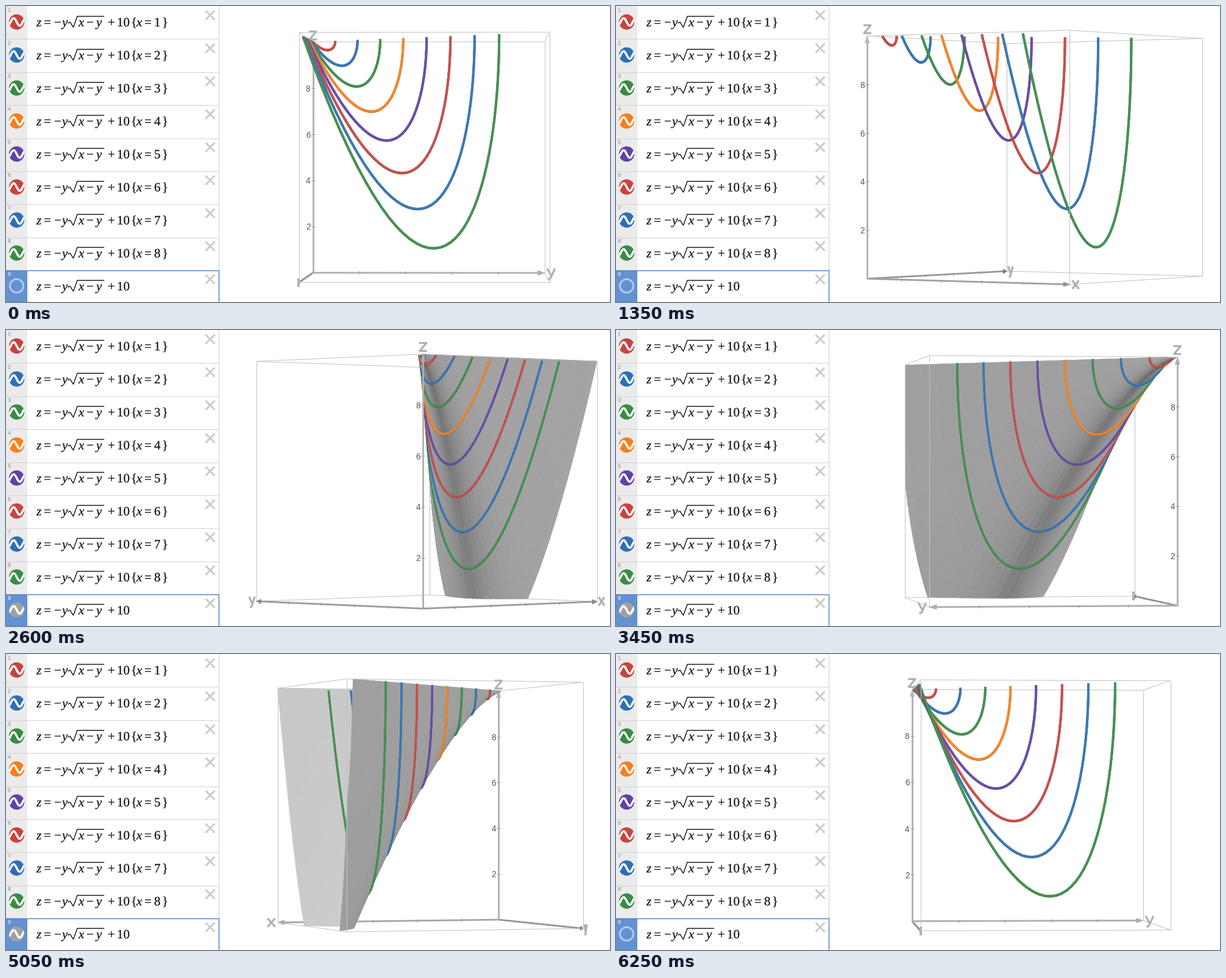
Recreate the animation shown at these times as a matplotlib script. Size 991 by 487 pixels, loop 6300 ms.

```python
import numpy as np
import matplotlib.pyplot as plt
from matplotlib.animation import FuncAnimation
from matplotlib.collections import LineCollection, PolyCollection
from matplotlib.colors import to_rgb
from matplotlib.patches import Circle, PathPatch, Rectangle
from matplotlib.path import Path
from matplotlib.textpath import TextPath

W, H, DPI = 991, 487, 64
PX = 72 / DPI                      # points per pixel
STEP, FRAMES, HOLD = 50, 126, 9
SURFACE_ON, SURFACE_OFF = 1450, 5350

CX, CY, DIST, FOCAL = 690, 249, 125.6, 4963
X0, X1, Y0, Y1 = 0.25, 10.25, 0, 10
MID = np.array([5.25, 5, 5])
TURN_STEPS = [0, 6, 29, 43, 60, 92, 116]
TURN_DEG = [1.05, -17.6, -90.4, -133.9, -188, -288.65, -364.3]

RED, BLUE, GREEN, ORANGE, PURPLE = "#c74440", "#2d70b3", "#388c46", "#fa7e19", "#6042a6"
COLORS = [RED, BLUE, GREEN, ORANGE, PURPLE, RED, BLUE, GREEN]

fig = plt.figure(figsize=(W / DPI, H / DPI), dpi=DPI, facecolor="white")
ax = fig.add_axes([0, 0, 1, 1])
ax.set_xlim(0, W)
ax.set_ylim(H, 0)
ax.axis("off")


# ---------- expression list ----------
def glyphs(x, y, s, size, family="Liberation Serif", style="normal"):
    path = TextPath((0, 0), s, size=size, prop=dict(family=family, style=style))
    return Path(path.vertices * [1, -1] + [x, y], path.codes)


def add_text(paths, color, weight=0):
    ax.add_patch(PathPatch(Path.make_compound_path(*paths), fc=color, ec=color,
                           lw=weight * PX, zorder=6))


def rect(x, y, w, h, color):
    ax.add_patch(Rectangle((x, y), w, h, fc=color, lw=0, zorder=4))


def stroke(xs, ys, color, width, **kw):
    return ax.plot(xs, ys, color=color, lw=width * PX, zorder=6, **kw)[0]


def wave(cy, disc):
    x = np.linspace(3, 32, 50)
    line = stroke(x, cy + 6.2 * np.sin(2 * np.pi * (x - 17.5) / 20), "white", 3.5)
    line.set_clip_path(disc)
    return line


def disc(cy, color):
    return ax.add_patch(Circle((17.5, cy), 12.6, fc=color, lw=0, zorder=5))


def formula(base, k):
    roman = [(62, "="), (79, "\u2212"), (132, "\u2212"), (167, "+"), (182, "10")]
    italic = [(50, "z"), (92, "y"), (119, "x"), (148, "y")]
    if k:
        roman += [(205, "{"), (227, "="), (243, str(k)), (256, "}")]
        italic += [(214, "x")]
    return ([glyphs(x, base, s, 21) for x, s in roman]
            + [glyphs(x, base, s, 21, style="italic") for x, s in italic])


rect(0, 0, 35, H, "#ebebeb")
rect(0, 435, 35, 52, "#6391d2")
rect(349, 0, 1.2, H, "#cccccc")
text, numbers = [], []
for i in range(9):
    top = 54.3 * i
    text += formula(top + 33.5, (i + 1) % 9)
    num = glyphs(3, top + 9.5, str(i + 1), 9, "Liberation Sans")
    if i < 8:
        numbers.append(num)
        rect(0, round(54.4 * (i + 1)), 349, 1, "#d2d2d2")
        wave(top + 26.3, disc(top + 26.3, COLORS[i]))
    else:
        add_text([num], "white")
    stroke([102, 105, 110.5, 117, 160.5], top + np.array([28, 26.5, 35, 17, 17]),
           "black", 1.3)
    for s in (1, -1):
        stroke([328.5, 341.5], [top + 15.2 - 6.5 * s, top + 15.2 + 6.5 * s], "#cccccc", 3)
add_text(text, "#111111", 0.25)
add_text(numbers, "#888888")
stroke([0, 349, 349], [435.3, 435.3, 487], "#4a80c8", 1.4)
stroke([0, 349], [486.6, 486.6], "#4a80c8", 1)

ring = ax.add_patch(Circle((17.5, 460.5), 11, fc="none", ec="#b4cbec", lw=3 * PX, zorder=5))
ball = disc(460.5, "#a0a0a0")
ball_wave = wave(460.5, ball)


# ---------- geometry ----------
def project(p, phi):
    """Screen positions and nearness of points (..., 3)."""
    q = np.asarray(p, float) - MID
    c, s = np.cos(phi), np.sin(phi)
    near = q[..., 0] * c + q[..., 1] * s
    k = FOCAL / (DIST - near)
    side = q[..., 1] * c - q[..., 0] * s
    return np.stack([CX + k * side, CY - k * q[..., 2]], -1), near


def on_surface(x, w):
    """Point of z = 10 - y sqrt(x - y), with w = sqrt(x - y)."""
    y = x - w * w
    return np.stack([x + 0 * w, y, 10 - y * w], -1)


def make_sheets():
    crit = 675 ** (1 / 3)          # x where the valley reaches z = 0
    x = np.r_[np.linspace(X0, crit, 38),
              crit + (10 - crit) * np.linspace(0, 1, 8)[1:] ** 2, 10.08, 10.17, X1]
    # roots of w^3 - x w + 10 = 0, or the valley itself where there are none
    r = 2 * np.sqrt(x / 3)
    a = np.arccos(np.clip(-15 / x * np.sqrt(3 / x), -1, 1)) / 3
    spans = [(r * np.cos(a), np.sqrt(x)),
             (np.sqrt(np.maximum(x - 10, 0)), r * np.cos(a - 2 * np.pi / 3))]
    quads, mids, normals = [], [], []
    v = np.linspace(0, 1, 18)
    for lo, hi in spans:
        w = lo[:, None] + (hi - lo)[:, None] * v
        g = on_surface(x[:, None], w)
        q = np.stack([g[:-1, :-1], g[1:, :-1], g[1:, 1:], g[:-1, 1:]], 2).reshape(-1, 4, 3)
        wm = (w[:-1, :-1] + w[1:, 1:] + w[1:, :-1] + w[:-1, 1:]).ravel() / 4
        m = q.mean(1)
        n = np.stack([-m[:, 1] / 2, m[:, 1] / 2 - wm ** 2, -wm], -1)
        quads.append(q)
        mids.append(m)
        normals.append(n / np.linalg.norm(n, axis=1)[:, None])
    return map(np.concatenate, (quads, mids, normals))


quads, mids, normals = make_sheets()
curves = [on_surface(np.full(41, k), np.linspace(0, np.sqrt(k - 0.03), 41))
          for k in np.arange(1.0, 9)]


def ribbon(p, half):
    t = np.gradient(p, axis=0)
    t /= np.hypot(t[:, 0], t[:, 1])[:, None] + 1e-6
    n = np.stack([-t[:, 1], t[:, 0]], -1) * half
    a, b = p + n, p - n
    return np.stack([a[:-1], a[1:], b[1:], b[:-1]], 1)


def content(phi, solid):
    polys, depth, cols = [], [], []

    def put(q, d, c):
        polys.append(q)
        depth.append(d)
        cols.append(np.broadcast_to(c, (len(q), 3)))

    if solid:
        p, near = project(quads, phi)
        cam = MID + DIST * np.array([np.cos(phi), np.sin(phi), 0])
        outside = ((cam - mids) * normals).sum(1) > 0
        ny, nz = normals[:, 1], normals[:, 2]
        valley = (1 - np.abs(ny)) ** 1.5
        gray = np.where(outside, 0.64 - valley * (0.1 + 0.2 * nz ** 2), 0.765 - 0.06 * nz)
        put(p, near.mean(1), gray[:, None])
    half = 1.45 if solid else 1.75
    for pts, color in zip(curves, COLORS):
        p, near = project(pts, phi)
        d = (near[1:] + near[:-1]) / 2 + 0.55
        rgb = 1 - (1 - np.array(to_rgb(color))) * 0.93
        put(ribbon(p, half), d, rgb * 0.75)
        put(ribbon(p - [0, 0.6], half - 0.3), d + 0.03, rgb)
    order = np.argsort(np.concatenate(depth))
    return np.concatenate(polys)[order], np.concatenate(cols)[order]


# ---------- box and axes ----------
LETTERS = {
    "x": [[(-6.5, -7), (6.5, 7)], [(6.5, -7), (-6.5, 7)]],
    "y": [[(-6.5, -7.5), (0.5, 5)], [(6.5, -7.5), (-1, 9), (-5, 10.5)]],
    "z": [[(-6.5, -6.5), (5.5, -6.5), (-5.5, 6.5), (6.5, 6.5)]],
}
AXES = {"x": (1, 0, 0), "y": (0, 1, 0), "z": (0, 0, 1)}
ORIGIN = np.array([X0, Y0, 0.0])


def axis_lines(name, phi):
    d = np.array(AXES[name], float)
    view = abs(d @ [np.cos(phi), np.sin(phi), 0])
    flat = 1 if name == "z" else max(np.sqrt(1 - view ** 2), 0.08)
    shade = 0.69 - 0.12 * view
    out = []

    def seg(a, b, g, width):
        p, _ = project(ORIGIN + np.outer([a, b], d), phi)
        out.append((p, g, width))

    seg(0, 9.75, shade, 2.8)
    for j in range(8):
        seg(9.7 + 0.3 * j / 8, 9.7 + 0.3 * (j + 1.3) / 8, shade - 0.25 * view ** 3, 8 - j)
    for t in (2, 4, 6, 8):
        at = t - X0 if name == "x" else t
        p, _ = project(ORIGIN + at * d, phi)
        e = np.array([3, 0]) if name == "z" else np.array([0, 2.5])
        out.append((np.array([p - e, p + e]), 0.6, 1))
    c, _ = project(ORIGIN + 10.28 * d, phi)
    for s in LETTERS[name]:
        out.append((c + np.array(s) * [flat, 1], 0.69, 3.2))
    return out


def frame_lines(phi):
    """Lines behind and in front of the plotted shapes."""
    cam = MID + DIST * np.array([np.cos(phi), np.sin(phi), 0])
    facing = {"x0": cam[0] < X0, "x1": cam[0] > X1, "y0": cam[1] < Y0, "y1": cam[1] > Y1}
    val = {"x0": X0, "x1": X1, "y0": Y0, "y1": Y1}
    layers = [], []

    def edge(a, b, front):
        layers[front].append((project([a, b], phi)[0], 0.76, 1))

    for fx in ("x0", "x1"):
        for z in (0, 10):
            edge((val[fx], Y0, z), (val[fx], Y1, z), facing[fx])
        for fy in ("y0", "y1"):
            edge((val[fx], val[fy], 0), (val[fx], val[fy], 10), facing[fx] or facing[fy])
    for fy in ("y0", "y1"):
        for z in (0, 10):
            edge((X0, val[fy], z), (X1, val[fy], z), facing[fy])
    for name, front in (("x", facing["y0"]), ("y", facing["x0"]),
                        ("z", facing["x0"] or facing["y0"])):
        layers[front].extend(axis_lines(name, phi))
    return layers


shapes = ax.add_collection(PolyCollection([], edgecolors="face", linewidths=0.5 * PX, zorder=2),
                           autolim=False)
line_sets = [ax.add_collection(LineCollection([], zorder=z), autolim=False) for z in (1, 3)]
tick_text = [ax.text(0, 0, str(t), family="Liberation Sans", size=13.5 * PX, color="#555555",
                     ha="center", va="center_baseline", zorder=3.5) for t in (2, 4, 6, 8)]


def update(i):
    t = i * STEP
    phi = np.radians(np.interp(max(0, i - HOLD), TURN_STEPS, TURN_DEG))
    solid = SURFACE_ON <= t < SURFACE_OFF
    verts, cols = content(phi, solid)
    shapes.set_verts(verts)
    shapes.set_facecolor(cols)
    for coll, lines in zip(line_sets, frame_lines(phi)):
        coll.set_segments([p for p, _, _ in lines])
        coll.set_color([(g, g, g) for _, g, _ in lines])
        coll.set_linewidth([w * PX for _, _, w in lines])
    for label, z in zip(tick_text, (2, 4, 6, 8)):
        (x, y), _ = project(ORIGIN + [0, 0, z], phi)
        label.set_position((x - 8, y))
    ring.set_visible(not solid)
    ball.set_visible(solid)
    ball_wave.set_visible(solid)
    return [shapes, *line_sets, *tick_text, ring, ball, ball_wave]


anim = FuncAnimation(fig, update, frames=FRAMES, interval=STEP, repeat=True,
                     repeat_delay=0, blit=False)
plt.show()
```
